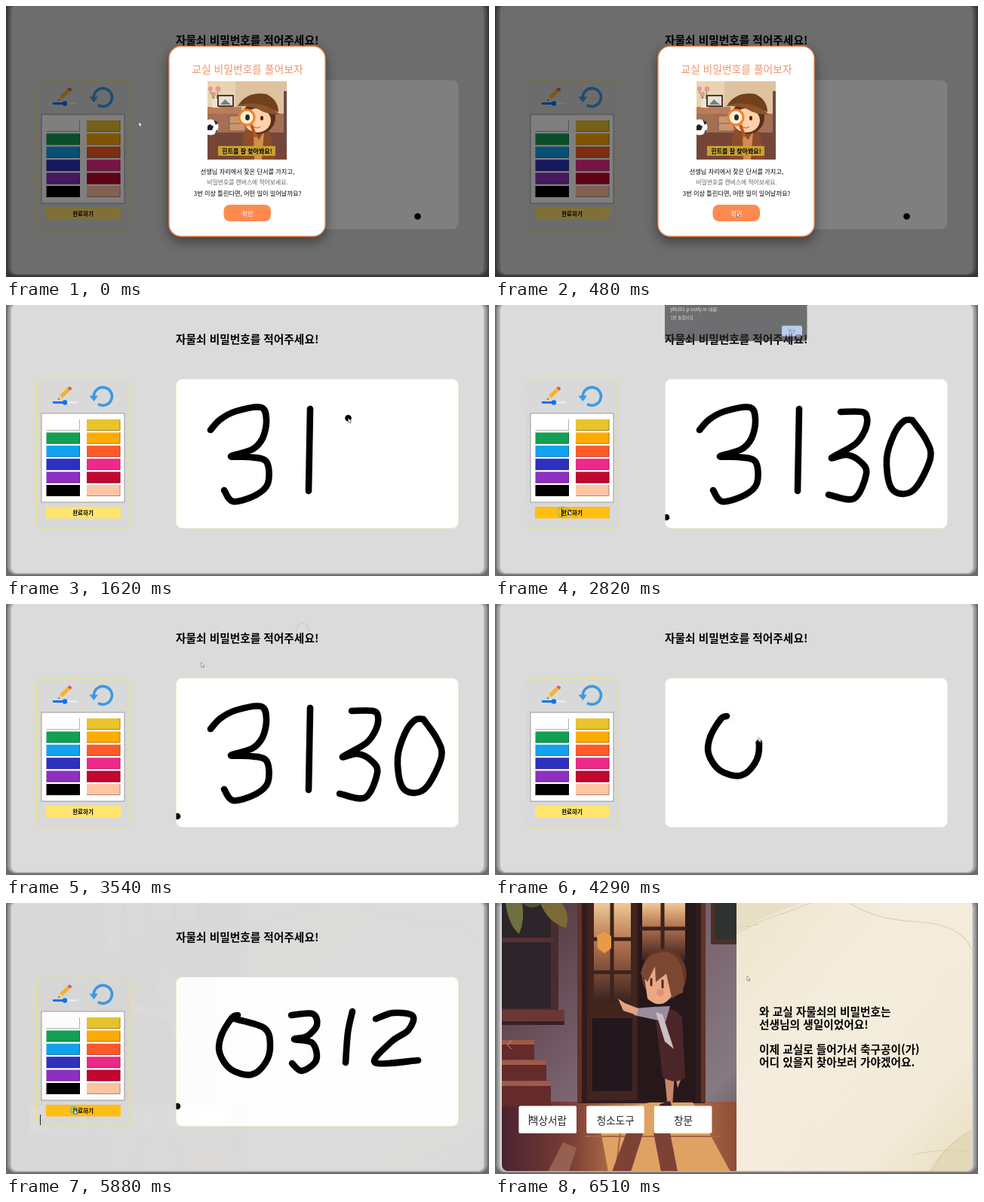
These frames come from a looping animation (640x360 px, 6570 ms). An HTML page:

```html
<!DOCTYPE html>
<html lang="ko">
<head>
<meta charset="utf-8">
<style>
html, body { margin: 0; width: 100%; height: 100%; overflow: hidden; background: #777; }
svg { display: block; width: 100vw; height: 100vh; }
text { font-family: "Noto Sans CJK KR", "Noto Sans CJK", sans-serif; dominant-baseline: central; white-space: pre; }
.heavy { font-weight: 900; }
.mid { text-anchor: middle; }
.ink { fill: none; stroke: #000; stroke-width: 8.6; stroke-linecap: round; stroke-linejoin: round; }
#card { filter: drop-shadow(0 6px 8px rgba(0,0,0,.45)); }
</style>
</head>
<body>
<svg viewBox="0 0 640 360" preserveAspectRatio="none">
  <defs>
    <clipPath id="boardClip"><rect x="225.5" y="98.5" width="374" height="198" rx="8"/></clipPath>
    <clipPath id="pictureClip"><rect x="267" y="100" width="105" height="104"/></clipPath>
    <clipPath id="pageClip"><rect x="9" y="-8" width="623" height="364" rx="8"/></clipPath>
    <linearGradient id="wall" x2="1" y2="1"><stop stop-color="#4d3038"/><stop offset=".5" stop-color="#7b6470"/><stop offset=".8" stop-color="#857a82"/><stop offset="1" stop-color="#5c434b"/></linearGradient>
    <linearGradient id="floor"><stop stop-color="#4a2230"/><stop offset=".3" stop-color="#7c3f35"/><stop offset=".6" stop-color="#d09055"/><stop offset="1" stop-color="#8e4d38"/></linearGradient>
    <linearGradient id="glass" x2="0" y2="1"><stop stop-color="#efc993"/><stop offset=".4" stop-color="#b5734f"/><stop offset="1" stop-color="#3a211f"/></linearGradient>
    <linearGradient id="paper" x2="1" y2="1"><stop stop-color="#efe5cd"/><stop offset=".35" stop-color="#f4ecdc"/><stop offset=".75" stop-color="#f3ebda"/><stop offset="1" stop-color="#ebdfc2"/></linearGradient>
  </defs>

  <rect width="640" height="360" fill="#6c6c6c"/>
  <rect x="2" y="-4" width="636" height="362" rx="10" fill="#929292"/>
  <rect x="4.5" y="-2" width="631" height="359" rx="9" fill="#b2b2b2"/>

  <g id="drawPage">
    <rect x="7" y="-1" width="626" height="357" rx="8" fill="#dbdbdb"/>
    <text class="heavy" x="225" y="44.5" font-size="14.7">자물쇠 비밀번호를 적어주세요!</text>
    <rect x="40.5" y="98.5" width="124" height="199" rx="8" fill="#d9d9d9" stroke="#ebe57c"/>
    <g id="pencil">
      <path d="M69 126L71.5 119.5L81.5 110L85 113.5L75 123.5Z" fill="#f4b22e"/>
      <path d="M69 126L71.5 119.5L75 123.5Z" fill="#edcb9d"/>
      <path d="M69 126l.8-2.200 1.400 1.400z" fill="#333"/>
      <path d="M81.5 110L83.5 108.5Q87.5 109 87 112L85 113.5Z" fill="#e7524e"/>
      <path d="M62 129.5H93" stroke="#eee" stroke-width="2.6" stroke-linecap="round"/>
      <path d="M63 129.5H78" stroke="#0b72f2" stroke-width="2.8" stroke-linecap="round"/>
      <circle cx="78" cy="129.5" r="3.2" fill="#0b72f2"/>
    </g>
    <path d="M116.5 123A12 12 0 1 1 122 131.5" fill="none" stroke="#3d9ae0" stroke-width="3.6"/>
    <path d="M110.5 120.5H122L116.5 128Z" fill="#3d9ae0"/>
    <rect x="47" y="144" width="110" height="118" fill="#fff" stroke="#9a9a9a"/>
    <g id="swatches"></g>
    <rect id="done" x="53" y="268" width="99" height="15.5"/>
    <text class="heavy mid" x="102" y="275.5" font-size="7.5">완료하기</text>
    <rect x="225.5" y="98.5" width="374" height="198" rx="8" fill="#fff" stroke="#f3ead2"/>
    <g clip-path="url(#boardClip)"><g id="inks"></g><circle id="dot" r="4.3"/></g>
  </g>

  <g id="storyPage">
    <g clip-path="url(#pageClip)">
      <rect x="9" y="0" width="311" height="357" fill="url(#wall)"/>
      <path d="M9 0H84V142H9Z" fill="#4a2c30"/>
      <path d="M9 0H74V140H9Z" fill="#2c2529"/>
      <path d="M9 46H78V52H9Z" fill="#553034"/>
      <path d="M9 142H92V157H9Z" fill="#693834"/>
      <path d="M9 157H92V162H9Z" fill="#38202a"/>
      <path d="M14 0Q18 30 32 41Q40 22 36 0Z" fill="#6d7040"/>
      <path d="M36 0Q50 12 62 0Z" fill="#4b5632"/>
      <path d="M60 0Q70 26 94 33Q100 14 88 0Z" fill="#7b6a35"/>
      <path d="M9 264H320V357H9Z" fill="url(#floor)"/>
      <g fill="#642b2a"><path d="M9 184H52V208H9Z"/><path d="M9 213H68V236H9Z"/><path d="M9 241H74V270H9Z"/></g>
      <path d="M9 182H52V188H9ZM9 209H68V215H9ZM9 237H74V243H9Z" fill="#a05a49"/>
      <path d="M70 357L90 318L108 325L98 357Z" fill="#95604f"/>
      <path d="M110 0H278V266H110Z" fill="#321b1d"/>
      <path d="M122 0H188V262H122Z" fill="#42241f"/>
      <path d="M131 0H180V132H131Z" fill="url(#glass)"/>
      <path d="M190 0H266V262H190Z" fill="#26171b"/>
      <path d="M195 0H252V76H195Z" fill="url(#glass)"/>
      <path d="M129 153H182V250H129Z" fill="#21171c"/>
      <path d="M155 0V134M129 48H182M129 92H182M222 0V72M192 34H254" stroke="#3c231c" stroke-width="5"/>
      <path d="M112 0V265M276 0V265" stroke="#613327" stroke-width="6"/>
      <path d="M135 43L145 38L154 44V60L145 67L136 60Z" fill="#e89a45"/>
      <path d="M286 0H320V55H286Z" fill="#4b302c"/><path d="M292 0H320V48H292Z" fill="#2e3230"/>
      <path d="M136 280L205 265H262L312 357H150Z" fill="#dfa262"/>
      <path d="M170 268L160 357M222 266L240 357M120 310H300" stroke="#a96443" stroke-width="2" fill="none"/>
      <path d="M176 300H198L180 357H155ZM210 305H232L242 357H220Z" fill="#7c4236"/>
      <!-- child at the door -->
      <path d="M224 222L228 264L219 270H235L238 226ZM238 225L242 246L250 224Z" fill="#c88768"/>
      <path d="M219 267L232 263L234 270H217Z" fill="#3b2023"/>
      <path d="M212 148Q234 132 248 152L252 232Q238 242 222 231Z" fill="#4b2528"/>
      <path d="M210 138L232 137L226 158L184 149L185 140Z" fill="#9a8b9d"/>
      <path d="M213 145L222 148L237 194L225 184Z" fill="#cbbfc6"/>
      <path d="M188 149L170 143L163 127L172 133L190 140Z" fill="#e3a482"/>
      <ellipse cx="224" cy="95" rx="30" ry="34" fill="#633827"/>
      <path d="M197 91Q203 78 232 83L237 119Q222 145 202 127Z" fill="#eaa985"/>
      <path d="M193 94Q199 63 230 65Q255 77 249 119L234 125L227 94L213 105L212 84L202 105Z" fill="#7c4732"/>
      <path d="M207 101V109M222 103V112" stroke="#4a2925" stroke-width="3" stroke-linecap="round"/>
      <circle cx="219" cy="119" r="5" fill="#e37e68" opacity=".6"/>

      <rect x="320" y="0" width="312" height="357" fill="url(#paper)"/>
      <g fill="none" stroke="#dccfb2" stroke-width="1.200">
        <path d="M320 40Q350 24 372 17T418 0M324 33L350 28M470 0Q502 22 560 25T632 62"/>
        <path d="M580 357Q593 323 632 302M553 335Q590 325 632 330"/>
      </g>
      <path d="M320 0H405Q370 12 320 38Z" fill="#e2d7b8" opacity=".5"/>
      <path d="M632 300V357H575Q590 325 632 300Z" fill="#ddd0ab" opacity=".5"/>
    </g>
    <path d="M22 183L16 188.5L22 194" fill="none" stroke="#b79d9b"/>
    <g id="choices"></g>
    <g id="story" class="heavy" font-size="14.7"></g>
  </g>

  <rect id="caret" width="1" fill="#222"/>

  <g id="alert">
    <rect x="225" y="-6" width="188.5" height="54" rx="4" fill="#292a2d"/>
    <text x="232.5" y="5.5" font-size="6.2" fill="#eee">j8b201.p.ssafy.io 내용:</text>
    <text x="232.5" y="17" font-size="5.6" fill="#d4d4d4">1번 틀렸어요</text>
    <rect x="380" y="27.5" width="27" height="14" rx="2" fill="#a8c7fa"/>
    <text class="mid" x="393.5" y="34.5" font-size="5.5" fill="#28466f">확인</text>
  </g>

  <g id="modal">
    <rect width="640" height="360" opacity=".5"/>
    <rect id="card" x="216" y="53.5" width="207" height="252.5" rx="16" fill="#fff" stroke="#f78a4e" stroke-width="1.3"/>
    <text class="mid" x="320" y="83" font-size="13.8" fill="#f0956a">교실 비밀번호를 풀어보자</text>
    <g clip-path="url(#pictureClip)">
      <rect x="267" y="100" width="105" height="104" fill="#ead3b2"/>
      <path d="M304 100H372V160H304Z" fill="#dfc29f"/>
      <path d="M267 134H312V143H267Z" fill="#bb7c57"/>
      <path d="M267 143H372V204H267Z" fill="#a46f55"/>
      <path d="M267 168H372V204H267Z" fill="#754638"/>
      <path d="M296 146H317V166H296Z" fill="#c99672" stroke="#8f5c43"/><path d="M296 156H317" stroke="#8f5c43"/>
      <path d="M368 113H372V185H368Z" fill="#6c4b43"/>
      <path d="M278 134L275 119M278 132L281 111M278 130L270 112" stroke="#6b8150"/>
      <g fill="#e69892"><circle cx="275" cy="117" r="3"/><circle cx="281" cy="110" r="3.5"/><circle cx="271" cy="110" r="3"/></g>
      <path d="M274 123H281L283 135H273Z" fill="#f0e1d1"/>
      <rect x="281" y="119" width="20" height="14" fill="#e8e2d6" stroke="#4c3a34" stroke-width="2"/>
      <path d="M284 131L290 124L298 131Z" fill="#758079"/>
      <circle cx="271" cy="161" r="10.5" fill="#fff"/>
      <path d="M270 157l5 3-2 5h-6l-1-5zM275 151l6 4-3 3zM278 166l3-2-4 7z" fill="#222"/>
      <path d="M316 166Q333 158 350 167L357 204H311Z" fill="#8d4d29"/>
      <path d="M328 166L335 178L342 166L339 204H329Z" fill="#d58d4c"/>
      <circle cx="335" cy="148" r="22" fill="#57301f"/>
      <ellipse cx="333" cy="152" rx="18" ry="16" fill="#ffd1a8"/>
      <path d="M307 133Q319 113 345 117Q361 125 361 141Q336 129 307 133Z" fill="#70401f"/>
      <path d="M305 133Q337 122 363 144Q347 145 334 137Q320 132 305 133Z" fill="#8c5228"/>
      <ellipse cx="339" cy="149" rx="2" ry="3" fill="#402318"/>
      <path d="M325 158L331 174" stroke="#b95420" stroke-width="4"/>
      <circle cx="319" cy="148" r="10" fill="#fff1dc" stroke="#ee8228" stroke-width="3"/>
      <ellipse cx="320" cy="148" rx="3" ry="4" fill="#402318"/>
      <path d="M327 160Q333 164 337 160" fill="none" stroke="#a44e35"/>
      <rect x="281" y="186" width="76" height="13" fill="#c6a133"/>
      <text class="heavy mid" x="319.5" y="192" font-size="8">힌트를 잘 찾아봐요!</text>
    </g>
    <g class="mid" font-size="8.2" font-weight="500">
      <text x="320" y="219">선생님 자리에서 찾은 단서를 가지고,</text>
      <text x="320" y="233.5" font-size="7.8" font-weight="400" fill="#666">비밀번호를 캔버스에 적어보세요.</text>
      <text x="320" y="247.5">3번 이상 틀린다면, 어떤 일이 일어날까요?</text>
    </g>
    <rect x="288.5" y="264" width="62.5" height="22" rx="8" fill="#ff8a50"/>
    <text class="mid" x="320" y="275" font-size="8.2" font-weight="500" fill="#fff">확인</text>
  </g>

  <circle id="ring" fill="none" stroke="#35b5c5" stroke-width="1.2"/>
  <path id="cursor" d="M0 0V6L1.5 4.7L2.5 7L3.6 6.5L2.6 4.3H4.5Z" fill="#fff" stroke="#444" stroke-width=".5"/>
</svg>

<script>
const LOOP = 6570, INK_LAG = 8, BLINK = 340;
const MODAL_CLOSE = 600, WRONG_CLICK = 2690, ALERT_CLOSE = 3390, CLEAR = 3880, PAGE_SWAP = 5880;
const $ = id => document.getElementById(id);
const clamp = v => Math.max(0, Math.min(1, v));
const ramp = (t, start, length) => clamp((t - start) / length);
const ease = p => p * p * (3 - 2 * p);

function add(parent, tag, attrs, content = '') {
  const node = document.createElementNS('http://www.w3.org/2000/svg', tag);
  for (const key in attrs) node.setAttribute(key, attrs[key]);
  node.textContent = content;
  parent.append(node);
  return node;
}
function show(node, on) { node.style.display = on ? '' : 'none'; }
function fade(node, opacity) {
  show(node, opacity > 0);
  node.setAttribute('opacity', opacity);
}
function move(node, x, y) { node.setAttribute('transform', `translate(${x} ${y})`); }

// Catmull-Rom curve through "x,y x,y ..."
function smooth(text) {
  const p = text.split(' ').map(pair => pair.split(',').map(Number));
  let d = `M${p[0]}`;
  for (let i = 0; i < p.length - 1; i++) {
    const a = p[Math.max(0, i - 1)], b = p[i], c = p[i + 1], e = p[Math.min(p.length - 1, i + 2)];
    const lead = b.map((v, k) => v + (c[k] - a[k]) / 6);
    const trail = c.map((v, k) => v - (e[k] - b[k]) / 6);
    d += `C${lead} ${trail} ${c}`;
  }
  return d;
}

const palette = ['#fff', '#e9c42c', '#12a053', '#ffac02', '#12a2f0', '#ff5a2b',
  '#3030bf', '#ee2a88', '#8c30c0', '#c2072e', '#000', '#ffc6a5'];
palette.forEach((fill, i) => {
  const x = 53.5 + (i % 2) * 53.5, y = 152 + Math.floor(i / 2) * 17.4;
  add($('swatches'), 'rect', { x, y, width: 44.5, height: 15, fill });
  add($('swatches'), 'path', { d: `M${x} ${y + 14.5}h44V${y}`, fill: 'none', stroke: '#000', 'stroke-opacity': .3 });
});

['책상서랍', '청소도구', '창문'].forEach((label, i) => {
  const x = 31.5 + i * 89.7;
  add($('choices'), 'rect', { x, y: 269.5, width: 76.5, height: 36.5, rx: 2, fill: '#fff' });
  add($('choices'), 'text', { class: 'mid', x: x + 38.5, y: 287.5, 'font-size': 13.6, fill: '#222' }, label);
});

[[143.5, '와 교실 자물쇠의 비밀번호는'], [160, '선생님의 생일이었어요!'],
 [193.5, '이제 교실로 들어가서 축구공이(가)'], [210.5, '어디 있을지 찾아보러 가야겠어요.']]
  .forEach(([y, line]) => add($('story'), 'text', { x: 350, y }, line));

const strokes = [
  [850, 480, '271,166 284,152 305,141 338,136 345,153 340,177 326,192 298,201 322,202 345,208 347,237 330,253 301,261 289,246'],
  [1400, 130, '403,138 401,247'],
  [1640, 200, '458,142 486,142 493,150 490,167 477,185 446,203 466,199 484,208 492,224 476,257 442,252'],
  [1930, 270, '553,153 542,154 529,171 519,204 524,241 541,251 559,241 577,203 571,179 553,153'],
  [4100, 250, '307,149 299,153 285,177 283,199 298,221 325,228 344,212 350,188 342,166 303,154'],
  [4450, 250, '378,149 406,147 412,162 399,177 382,181 406,186 411,209 392,223 379,213'],
  [4850, 150, '459,144 453,172 450,212'],
  [5242, 176, '490,154 513,146 539,150 533,169 511,184 489,212 546,209']
].map(([start, length, points]) => {
  const path = add($('inks'), 'path', { class: 'ink', d: smooth(points) });
  const size = path.getTotalLength();
  const at = p => { const q = path.getPointAtLength(size * p); return [q.x, q.y]; };
  return { start, length, end: start + length, path, size, at };
});

const stops = [
  [0, 176, 154], [90, 176, 154], [430, 320, 274], [610, 322, 275],
  [2400, 227, 282], [2450, 180, 291], [2560, 90, 275], [2740, 90, 275], [2820, 98, 273],
  [3150, 393, 34], [ALERT_CLOSE, 393, 34], [3690, 127, 121], [3920, 127, 121],
  [5620, 227, 270], [5750, 90, 275], [5870, 90, 275], [6350, 334, 97], [LOOP, 334, 97]
];
for (const s of strokes) stops.push([s.start, ...s.at(0)], [s.end, ...s.at(1)]);
stops.sort((a, b) => a[0] - b[0]);

const clicks = [[510, 320, 275], [WRONG_CLICK, 90, 275], [3360, 393, 34], [3860, 127, 121], [5830, 90, 275],
  ...strokes.map(s => [s.start, ...s.at(0)])];

const activeStroke = t => strokes.find(s => t >= s.start && t < s.end);
const inked = (s, t) => ramp(t - INK_LAG, s.start, s.length);

function pointer(t) {
  const s = activeStroke(t);
  if (s) return s.at((t - s.start) / s.length);
  const i = stops.findIndex(stop => stop[0] > t);
  const [t0, x0, y0] = stops[i - 1], [t1, x1, y1] = stops[i];
  const p = ease((t - t0) / (t1 - t0));
  return [x0 + (x1 - x0) * p, y0 + (y1 - y0) * p];
}

// The brush preview stays where the pointer last touched the board.
function brushSpot(t, [x, y]) {
  const s = activeStroke(t);
  if (s) return s.at(inked(s, t));
  if (t < MODAL_CLOSE + 120) return [545.5, 279.5];
  if (t >= 2400 && t < CLEAR) return [227, 282];
  if (t >= 5620) return [227, 270];
  return x >= 225 ? [x, y] : null;
}

function caretSpot(t) {
  if (t >= PAGE_SWAP) return { since: 5800, x: 45, y: 281, height: 14 };
  if (t >= WRONG_CLICK) return { since: WRONG_CLICK, x: 88, y: 270, height: 12 };
  return { since: 700, x: 225, y: 36, height: 18 };
}

function render(t) {
  const [x, y] = pointer(t);
  fade($('storyPage'), ramp(t, PAGE_SWAP, 120));

  for (const s of strokes) {
    show(s.path, t >= s.start && (t < CLEAR || s.start > CLEAR));
    s.path.setAttribute('stroke-dasharray', `${s.size * inked(s, t) + .01} ${s.size + 20}`);
  }

  const spot = brushSpot(t, [x, y]);
  show($('dot'), spot);
  if (spot) move($('dot'), ...spot);

  const blocked = t >= WRONG_CLICK && t < ALERT_CLOSE;
  const hover = blocked || (x > 53 && x < 152 && y > 267 && y < 284);
  $('done').setAttribute('fill', hover ? '#ffbe12' : '#ffe46d');

  const caret = caretSpot(t);
  show($('caret'), t >= caret.since && (t - caret.since) % BLINK < BLINK / 2);
  for (const key of ['x', 'y', 'height']) $('caret').setAttribute(key, caret[key]);

  fade($('modal'), 1 - ramp(t, MODAL_CLOSE, 140));
  fade($('alert'), ramp(t, 2760, 100) * (1 - ramp(t, ALERT_CLOSE, 60)));

  const click = clicks.find(c => t >= c[0] && t < c[0] + 200);
  show($('ring'), click);
  if (click) {
    const p = (t - click[0]) / 200;
    move($('ring'), click[1], click[2]);
    $('ring').setAttribute('r', 3 + 6 * p);
    $('ring').setAttribute('opacity', 1 - p * p);
  }
  move($('cursor'), x, y);
}

const began = performance.now();
function tick() {
  render((performance.now() - began) % LOOP);
  requestAnimationFrame(tick);
}
tick();
</script>
</body>
</html>
```
